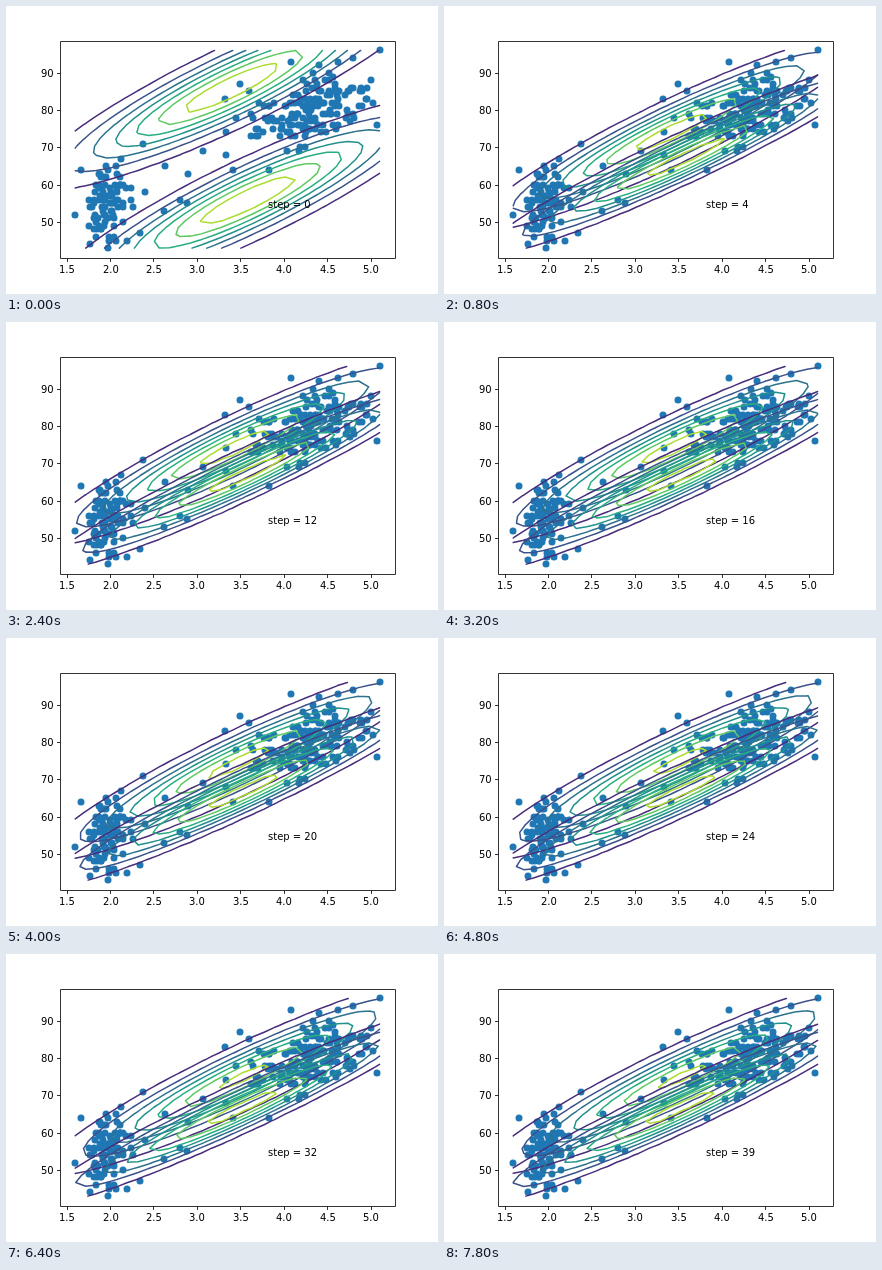
An HTML page that plays this animation: 432 px wide and 288 px high, repeating every 8000 ms.

```html
<!DOCTYPE html>
<html lang="en">
<head>
<meta charset="utf-8">
<title>Two-component mixture fit</title>
<style>
  html, body { margin: 0; width: 100%; height: 100%; overflow: hidden; background: #fff; }
  svg { display: block; width: 432px; height: 288px; }
  text { font: 10px "DejaVu Sans", sans-serif; fill: #000; }
  #dots { fill: #1f77b4; }
  #contours { fill: none; stroke-width: 1.5; stroke-linecap: round; }
  #axes { fill: none; stroke: #000; stroke-width: .8; }
</style>
</head>
<body>
<svg viewBox="0 0 432 288">
  <g id="dots"></g>
  <g id="contours"></g>
  <path id="axes"/>
  <g id="labels"></g>
  <text id="step" x="262" y="202"></text>
</svg>
<script>
const STEP_MS = 200, STEPS = 40, GRID = 30;
const X_MIN = 1.6, X_MAX = 5.1, Y_MIN = 43, Y_MAX = 96;
const VIRIDIS = ['#472d7b', '#3b528b', '#2c728e', '#21918c', '#28ae80', '#5ec962', '#addc30'];

// Poses: mean x, mean y, x deviation, slope, residual deviation
const UPPER = {
  start: [3.39, 86, 1.141, 10.73, 5.91],
  early: [3.42, 74.1, 1.12, 10.95, 4.66],
  late: [3.55, 75.1, 1.155, 10.75, 4.75]
};
const LOWER = {
  start: [3.586, 55.9, 1.141, 10.73, 5.91],
  early: [3.57, 67.2, 1.14, 10.83, 3.65],
  late: [3.5, 66.6, 1.17, 10.7, 3.6]
};

// Lone points outside the two clusters
const LONE = [
  [1.6, 52], [1.67, 64], [1.98, 43], [2.2, 45], [2.35, 47], [2.13, 67], [2.38, 71],
  [2.62, 53], [2.63, 65], [2.8, 56], [2.88, 55], [2.9, 63], [3.07, 69], [3.33, 74],
  [3.33, 68], [3.42, 64], [3.83, 64], [3.45, 78], [3.32, 83], [3.5, 87], [3.6, 85],
  [4.08, 93], [4.4, 92], [4.62, 93], [4.8, 94], [5.1, 96], [5, 88], [5.07, 76]
];

const byId = id => document.getElementById(id);
const px = x => 54 + (x - 1.425) * 86.961;
const py = y => 252 - (y - 40.35) * 3.7297;
const snap = v => Math.floor(v + .5) + .5;

function seeded(seed) {
  return () => {
    seed = seed + 0x6D2B79F5 | 0;
    let t = Math.imul(seed ^ seed >>> 15, seed | 1);
    t ^= t + Math.imul(t ^ t >>> 7, t | 61);
    return ((t ^ t >>> 14) >>> 0) / 4294967296;
  };
}

// Normal cloud with evenly filled radii and a trimmed tail
function cloud(count, random, place) {
  return Array.from({ length: count }, (_, i) => {
    const r = Math.sqrt(-2 * Math.log(1 - .92 * (i + random()) / count));
    const angle = 2 * Math.PI * random();
    return place(r * Math.cos(angle), r * Math.sin(angle));
  });
}

function drawDots() {
  const random = seeded(5);
  const points = [
    ...LONE,
    ...cloud(86, random, (a, b) => [1.63 + .31 * Math.exp(.46 * a), 54.3 + 1.8 * a + 5.2 * b]),
    ...cloud(150, random, (a, b) => [4.34 + .34 * a, 80.2 + 2.2 * a + 4.9 * b])
  ];
  byId('dots').innerHTML = points.map(([x, y]) =>
    `<circle cx="${Math.round(px(x))}" cy="${Math.round(py(Math.round(y)))}" r="3.5"/>`).join('');
}

function drawAxes() {
  let path = 'M54.5 35.5H389.5V252.5H54.5Z', labels = '';
  for (let x = 1.5; x <= 5; x += .5) {
    path += `M${snap(px(x))} 252.5v3.5`;
    labels += `<text x="${Math.ceil(px(x) - 8)}" y="267">${x.toFixed(1)}</text>`;
  }
  for (let y = 50; y <= 90; y += 10) {
    path += `M54.5 ${snap(py(y))}h-3.5`;
    labels += `<text x="35" y="${Math.round(py(y) + 4)}">${y}</text>`;
  }
  byId('axes').setAttribute('d', path);
  byId('labels').innerHTML = labels;
}

// The first step jumps close to the fit, then the fit drifts slowly
function poseAt({ start, early, late }, step) {
  const jump = Math.exp(-6 * step);
  const drift = (1 - Math.cos(Math.PI * step / (STEPS - 1))) / 2;
  return start.map((v, i) => {
    const fit = early[i] + (late[i] - early[i]) * drift;
    return fit + (v - fit) * jump;
  });
}

function levelStep(max) {
  const raw = max / 8, scale = 10 ** Math.floor(Math.log10(raw));
  return scale * [1, 1.5, 2, 2.5, 3, 4, 5, 6, 8, 10].find(m => m * scale >= raw);
}

const gridX = i => X_MIN + (X_MAX - X_MIN) * i / (GRID - 1);
const gridY = j => Y_MIN + (Y_MAX - Y_MIN) * j / (GRID - 1);

// Marching squares over the coarse grid
function isoline(z, level) {
  let path = '';
  for (let j = 0; j < GRID - 1; j++) {
    for (let i = 0; i < GRID - 1; i++) {
      const corners = [[i, j], [i + 1, j], [i + 1, j + 1], [i, j + 1]];
      const hits = [];
      corners.forEach(([ai, aj], c) => {
        const [bi, bj] = corners[(c + 1) % 4];
        const a = z[aj][ai], b = z[bj][bi];
        if (a > level === b > level) return;
        const f = (level - a) / (b - a);
        hits.push(px(gridX(ai + (bi - ai) * f)).toFixed(2) + ' ' +
                  py(gridY(aj + (bj - aj) * f)).toFixed(2));
      });
      for (let h = 0; h < hits.length; h += 2) path += `M${hits[h]}L${hits[h + 1]}`;
    }
  }
  return path;
}

function contourSet([mx, my, sx, slope, s]) {
  const density = (x, y) => {
    const u = (x - mx) / sx, v = (y - my - slope * (x - mx)) / s;
    return Math.exp(-(u * u + v * v) / 2) / (2 * Math.PI * sx * s);
  };
  const z = Array.from({ length: GRID }, (_, j) =>
    Array.from({ length: GRID }, (_, i) => density(gridX(i), gridY(j))));
  const max = Math.max(...z.flat()), gap = levelStep(max), count = Math.ceil(max / gap);
  let paths = '';
  for (let k = 1; k < count; k++) {
    const color = VIRIDIS[Math.round(k / count * 8) - 1];
    paths += `<path stroke="${color}" d="${isoline(z, k * gap)}"/>`;
  }
  return paths;
}

let shown = -1;
function render(now) {
  const step = Math.floor(now / STEP_MS) % STEPS;
  if (step === shown) return;
  shown = step;
  byId('contours').innerHTML =
    contourSet(poseAt(UPPER, step)) + contourSet(poseAt(LOWER, step));
  byId('step').textContent = 'step = ' + step;
}

drawDots();
drawAxes();
let start;
function tick(now) {
  start ??= now;
  render(now - start);
  requestAnimationFrame(tick);
}
render(0);
requestAnimationFrame(tick);
</script>
</body>
</html>
```
